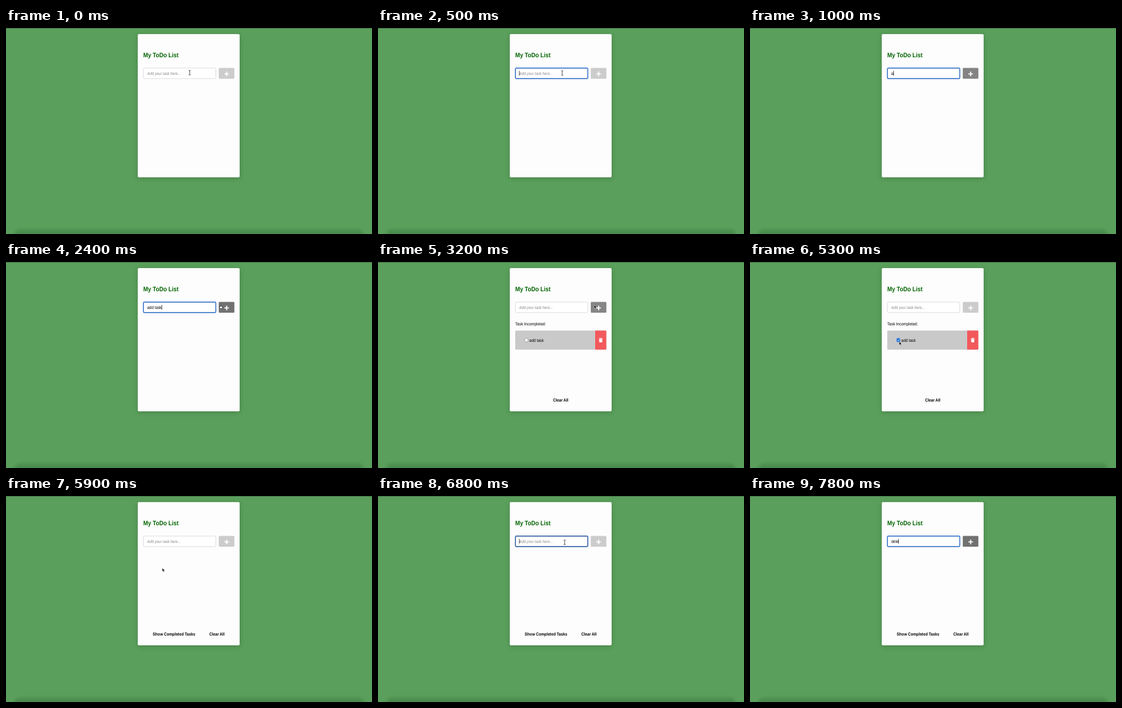
An HTML page that plays this animation: 600x338 px, repeating every 8000 ms.

```html
<!DOCTYPE html>
<html lang="en">
<head>
<meta charset="utf-8">
<title>To-do list</title>
<style>
  html, body { margin: 0; height: 100%; overflow: hidden; background: #5a9f5b; }
  svg { display: block; width: 100vw; height: 100vh; }
  text {
    font-family: "Liberation Sans", Arial, sans-serif;
    font-size: 7.1px;
    white-space: pre;
    text-rendering: geometricPrecision;
  }
  .bold { font-weight: 700; }
  .title { font-size: 10.6px; fill: #006400; }
  .hint { font-size: 6.75px; font-style: italic; fill: #858585; }
</style>
</head>
<body>
<svg viewBox="0 0 600 338" preserveAspectRatio="none">
  <defs>
    <filter id="soft" x="-20%" y="-20%" width="140%" height="140%"><feGaussianBlur stdDeviation="4"/></filter>
    <filter id="haze" x="-5%" y="-100%" width="110%" height="300%"><feGaussianBlur stdDeviation="2.5"/></filter>
  </defs>
  <rect width="600" height="338" fill="#5a9f5b"/>
  <rect width="600" height="1" fill="#42744a"/>
  <rect x="14" y="331" width="572" height="20" rx="8" fill="#245a2c" opacity=".28" filter="url(#haze)"/>
  <rect x="216" y="12" width="167" height="235" rx="2" opacity=".16" filter="url(#soft)"/>
  <rect x="216" y="10" width="167" height="235" rx="2" fill="#fdfdfd"/>

  <text class="bold title" data-at="225 47.6">My ToDo List</text>

  <rect id="field" x="225.3" y="65.8" width="118.6" height="17.2" rx="1.5" fill="#fff"/>
  <text id="hint" class="hint" data-at="231.6 76.6">Add your task here...</text>
  <text id="typed" data-at="231.6 76.6"></text>
  <rect id="caret" y="70.4" width=".7" height="7.6"/>

  <rect id="button" x="348.8" y="65.5" width="25.6" height="17.8" rx="1.3"/>
  <path d="M358 75.3h7.4M361.7 71.4v7.8" stroke="#fff" stroke-width="1.7"/>

  <g id="task">
    <text data-at="225 103.8">Task Incompleted:</text>
    <rect x="225" y="112.4" width="149.3" height="31.4" rx="1.3" fill="#c9c9c9"/>
    <path d="M356 112.4h17a1.3 1.3 0 0 1 1.3 1.3v28.8a1.3 1.3 0 0 1-1.3 1.3h-17z" fill="#f2595c"/>
    <path d="M362 125.2h2l.4-.7h1.5l.4.7h1.9v1h-6.2zM362.4 126.8h5.4l-.4 4.4q0 .8-.8.8h-3q-.8 0-.8-.8z" fill="#fff"/>
    <rect id="box" x="240.8" y="125.3" width="5" height="5.8" rx=".9" stroke-width=".6"/>
    <path id="tick" d="M241.9 128.4l1.1 1.3 1.8-3" fill="none" stroke="#fff" stroke-width=".8"/>
    <text data-at="248 131">add task</text>
  </g>

  <text id="clear" class="bold" data-at="287 229">Clear All</text>
  <g id="footer">
    <text class="bold" data-at="240.6 229">Show Completed Tasks</text>
    <text class="bold" data-at="333.2 229">Clear All</text>
  </g>

  <g id="cursor" stroke-linejoin="round">
    <path id="beam" d="M-1.6-3.8Q0-3.8 0-3Q0-3.8 1.6-3.8M0-3V3M-1.6 3.8Q0 3.8 0 3Q0 3.8 1.6 3.8" fill="none" stroke="#222" stroke-width=".8"/>
    <path id="hand" d="M-.9-3.3q.6-.6 1.1.1v2l2 .5q.8.2.7 1l-.5 2.6h-3l-1.9-2.6q-.2-.9.7-.7l.9.7z" fill="#fff" stroke="#222" stroke-width=".7"/>
    <path id="arrow" d="M0 0v6l1.4-1.2 1 2.2 1-.5-.9-2.1h1.8z" fill="#111" stroke="#fff" stroke-width=".45"/>
  </g>
</svg>
<script>
const LOOP = 8000, STEP = 100;
const ASPECT = 0.88;
const IDLE = [204, 204, 204], ACTIVE = [113, 113, 113];
const BLACK = [0, 0, 0], BLUE = [42, 104, 196];

const $ = id => document.getElementById(id);
const show = (id, on) => $(id).setAttribute('visibility', on ? 'inherit' : 'hidden');
const within = (t, a, b) => t >= a && t < b;

document.querySelectorAll('[data-at]').forEach(el => {
  const [x, y] = el.dataset.at.split(' ');
  el.setAttribute('transform', `translate(${x} ${y}) scale(${ASPECT} 1)`);
});

// Typing: time and text from then on
const typing = [
  [0, ''], [700, 'a'], [1100, 'ad'], [1200, 'add'], [1300, 'add '],
  [1500, 'add t'], [1800, 'add tas'], [2000, 'add task'], [2900, ''],
  [7200, 'd'], [7400, 'de'], [7600, 'del'], [7800, 'dele']
];

// Pointer: time, x, y, shape
const pointer = [
  [0, 301, 73.3, 'beam'], [100, 302, 73.8, 'beam'], [700, 302, 73.8, ''],
  [2300, 322, 74, 'beam'], [2400, 352, 73.6, 'hand'], [2500, 356, 73.8, 'hand'],
  [2600, 357, 73.8, 'hand'], [3000, 356.8, 69, 'arrow'], [3300, 353, 71, 'arrow'],
  [3500, 334, 83, 'arrow'], [3700, 317, 92, 'arrow'], [3800, 313, 92, 'arrow'],
  [3900, 310.5, 92.2, 'arrow'], [4200, 310.5, 92.2, 'arrow'], [4400, 287, 107, 'arrow'],
  [4600, 250, 128, 'arrow'], [4700, 244.5, 130.2, 'arrow'], [5700, 244.5, 130.2, 'arrow'],
  [6000, 262, 112, 'arrow'], [6300, 296, 84, 'arrow'], [6400, 304, 78, 'beam'],
  [6500, 306, 76, 'beam'], [7200, 306, 76, '']
];

const last = (rows, t) => rows.findLastIndex(r => r[0] <= t);

// The standard CSS "ease" curve
function ease(x) {
  if (x <= 0 || x >= 1) return x <= 0 ? 0 : 1;
  const curve = (s, a, b) => 3 * s * (1 - s) * ((1 - s) * a + s * b) + s ** 3;
  let lo = 0, hi = 1;
  for (let i = 0; i < 20; i++) {
    const mid = (lo + hi) / 2;
    if (curve(mid, .25, .25) < x) lo = mid; else hi = mid;
  }
  return curve(lo, .1, 1);
}

const mix = (a, b, k) => `rgb(${a.map((v, i) => Math.round(v + (b[i] - v) * k))})`;
const fade = (t, start, span) => ease((t - start) / span);

function drawField(t) {
  const text = typing[last(typing, t)][1];
  const focusAt = t >= 6700 ? 6700 : 200;
  const focused = within(t, 200, 2900) || t >= 6700;
  $('field').setAttribute('stroke', focused ? mix(BLACK, BLUE, fade(t, focusAt - 50, 300)) : '#cfcfcf');
  $('field').setAttribute('stroke-width', focused ? 1.4 : .7);
  show('hint', !text);
  $('typed').textContent = text;
  $('caret').setAttribute('x', 231.5 + (text ? $('typed').getComputedTextLength() * ASPECT : 0));
  show('caret', focused && !within(t, 2600, 2900));
}

function drawButton(t) {
  const on = t < 2900 ? fade(t, 700, 600) : t < 7000 ? 1 - fade(t, 3100, 600) : fade(t, 7200, 600);
  $('button').setAttribute('fill', mix(IDLE, ACTIVE, on));
}

function drawTask(t) {
  const open = within(t, 2900, 5400), done = t >= 4900;
  show('task', open);
  show('clear', open);
  show('footer', t >= 5400);
  $('box').setAttribute('fill', done ? '#1a6fdc' : '#fff');
  $('box').setAttribute('stroke', done ? '#1a6fdc' : '#777');
  $('tick').setAttribute('opacity', done ? 1 : 0);
}

function drawPointer(t) {
  const i = last(pointer, t);
  const [t0, x0, y0, shape] = pointer[i];
  const [t1, x1, y1] = pointer[i + 1] || [LOOP, x0, y0];
  const k = shape === 'arrow' ? (t - t0) / (t1 - t0) : 0;
  $('cursor').setAttribute('transform', `translate(${x0 + (x1 - x0) * k} ${y0 + (y1 - y0) * k})`);
  for (const id of ['beam', 'hand', 'arrow']) show(id, id === shape);
}

function frame() {
  const t = Math.floor(performance.now() % LOOP / STEP) * STEP;
  drawField(t);
  drawButton(t);
  drawTask(t);
  drawPointer(t);
  requestAnimationFrame(frame);
}
frame();
</script>
</body>
</html>
```
